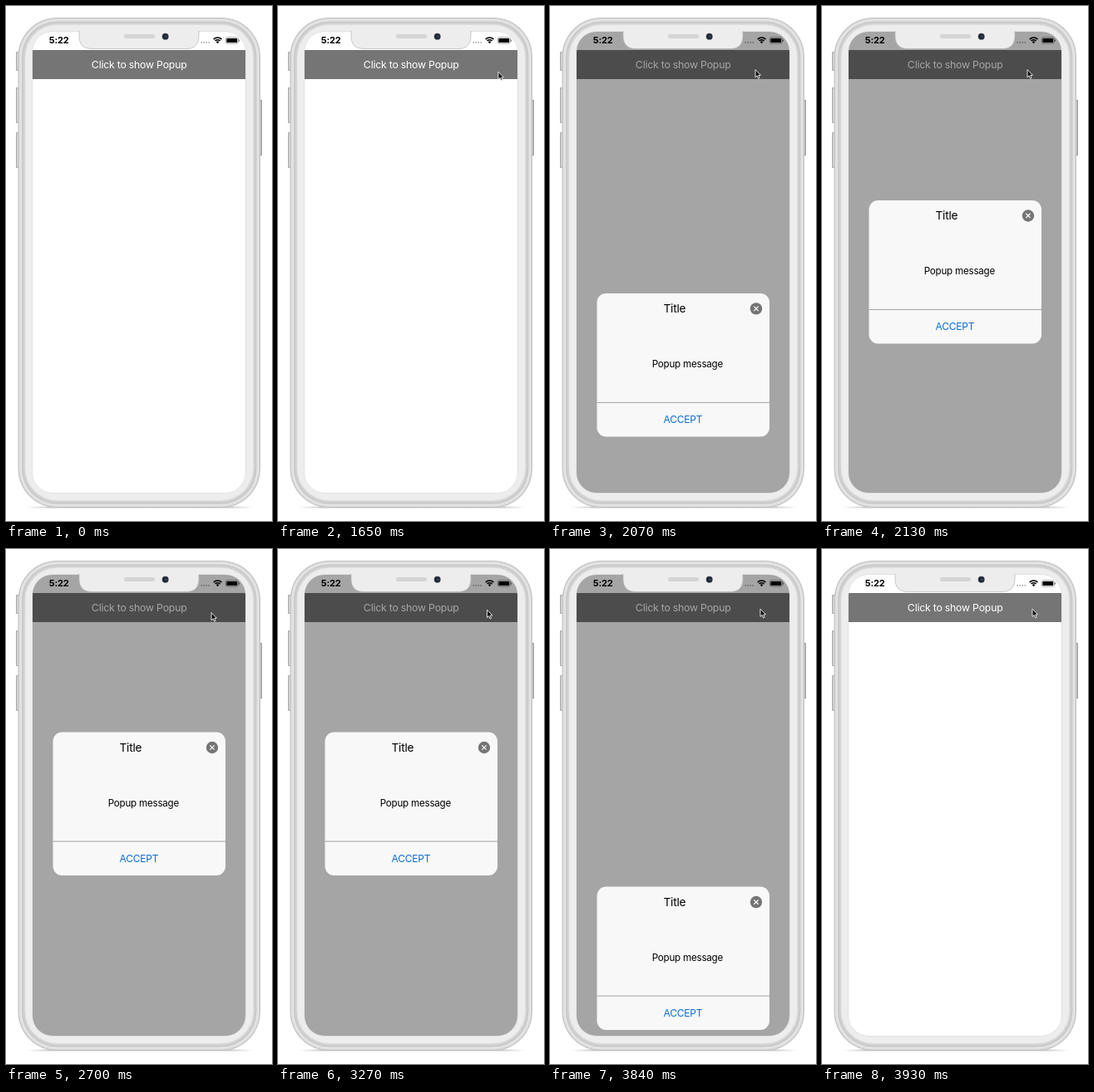
An HTML page with a canvas that plays this animation: 320 by 620 pixels, repeating every 4.23 s.

```html
<!DOCTYPE html>
<html lang="en">
<head>
<meta charset="utf-8">
<title>Popup demo</title>
<style>
  html, body { margin: 0; width: 100%; height: 100%; overflow: hidden; background: #fff; }
  canvas { display: block; width: 320px; height: 620px; }
</style>
</head>
<body>
<canvas id="stage"></canvas>
<script>
const W = 320, H = 620, LOOP = 4230, STEP = 30;
const FONT = 'Inter, "Liberation Sans", sans-serif';
const canvas = document.getElementById('stage');
const ctx = canvas.getContext('2d');
const dpr = window.devicePixelRatio || 1;
canvas.width = W * dpr;
canvas.height = H * dpr;

const clamp = v => Math.min(1, Math.max(0, v));
const sineInOut = p => (1 - Math.cos(Math.PI * clamp(p))) / 2;
const mix = (a, b, p) => a + (b - a) * p;

function box(x, y, w, h, r, fill) {
  ctx.beginPath();
  ctx.roundRect(x, y, w, h, r);
  if (fill) {
    ctx.fillStyle = fill;
    ctx.fill();
  }
}

function disc(x, y, r, fill) {
  ctx.beginPath();
  ctx.arc(x, y, r, 0, Math.PI * 2);
  ctx.fillStyle = fill;
  ctx.fill();
}

function text(str, x, y, size, color, spacing = 0, weight = 400) {
  ctx.font = `${weight} ${size}px ${FONT}`;
  ctx.letterSpacing = spacing + 'px';
  ctx.textAlign = 'center';
  ctx.fillStyle = color;
  ctx.fillText(str, x + spacing / 2, y);
}

function drawBody() {
  const shade = ctx.createLinearGradient(24, 0, 298, 0);
  shade.addColorStop(0, '#aaa0');
  shade.addColorStop(0.1, '#aaa9');
  shade.addColorStop(0.9, '#aaa9');
  shade.addColorStop(1, '#aaa0');
  box(24, 602.5, 274, 2, 1, shade);

  for (const [y, h] of [[55, 23], [98, 43], [152, 43]]) {
    box(12, y, 4, h, 1, '#a9a9a9');
    box(13, y + 1, 3, h - 2, 0.5, '#d4d4d4');
  }
  box(304, 113, 4, 67, 1, '#979797');
  box(304, 114, 3, 65, 0.5, '#c7c7c7');

  const rings = [[0, '#c0c0c0'], [1, '#dcdcdc'], [2, '#e3e3e3'],
                 [4.5, '#c8c8c8'], [6, '#d1d1d1'], [8, '#e0e0e0'], [9, '#ededed']];
  for (const [d, color] of rings)
    box(14.5 + d, 14 + d, 291.5 - 2 * d, 590 - 2 * d, 47 - d, color);
}

function drawNotch() {
  ctx.beginPath();
  ctx.moveTo(88, 30);
  ctx.lineTo(88, 36);
  ctx.bezierCurveTo(88, 46, 93, 51.5, 103, 51.5);
  ctx.lineTo(217, 51.5);
  ctx.bezierCurveTo(227, 51.5, 232, 46, 232, 36);
  ctx.lineTo(232, 30);
  ctx.fillStyle = '#ededed';
  ctx.fill();
  ctx.strokeStyle = '#b5b5b5';
  ctx.lineWidth = 0.7;
  ctx.stroke();
  box(142, 34, 37, 5, 2.5, '#d4d4d4');
  disc(191.7, 36.8, 4, '#4a4d55');
  disc(191.7, 36.8, 3.2, '#1c2333');
  disc(192.3, 36.8, 1.5, '#34486b');
}

function drawStatus() {
  text('5:22', 63.7, 45.3, 11, '#000', -0.2, 700);
  for (let i = 0; i < 4; i++) disc(235.3 + i * 3, 43.8, 0.85, '#999');

  ctx.strokeStyle = '#000';
  ctx.lineWidth = 1.5;
  for (const r of [4.3, 6.9]) {
    ctx.beginPath();
    ctx.arc(254.6, 45, r, -Math.PI * 0.75, -Math.PI * 0.25);
    ctx.stroke();
  }
  ctx.beginPath();
  ctx.moveTo(254.6, 45.3);
  ctx.arc(254.6, 45, 2.5, -Math.PI * 0.75, -Math.PI * 0.25);
  ctx.fillStyle = '#000';
  ctx.fill();

  box(264.3, 37.8, 15, 7.4, 2.2);
  ctx.strokeStyle = '#777';
  ctx.lineWidth = 0.7;
  ctx.stroke();
  box(265.4, 38.9, 12.8, 5.2, 1.2, '#000');
  box(280, 40.2, 1, 2.6, 0.5, '#777');
}

function drawPopup(top) {
  ctx.save();
  ctx.translate(0, top);
  box(56.5, 0, 207.5, 172.5, 11, '#f8f8f8');
  text('Title', 150, 23.5, 13.7, '#000', -0.2);
  text('Popup message', 165.5, 89, 11.6, '#000', -0.22);
  ctx.fillStyle = '#a3a3a3';
  ctx.fillRect(56.5, 131, 207.5, 1);
  text('ACCEPT', 160, 156, 12, '#0a6cd8', -0.2);
  disc(248, 18.5, 7.2, '#757575');
  ctx.beginPath();
  for (const s of [-1, 1]) {
    ctx.moveTo(245.3, 18.5 - 2.7 * s);
    ctx.lineTo(250.7, 18.5 + 2.7 * s);
  }
  ctx.strokeStyle = '#fff';
  ctx.lineWidth = 1.2;
  ctx.stroke();
  ctx.restore();
}

const REST = 220.5, TRAVEL = 391, SLIDE = 227;

function popupTop(t) {
  const away = t < 3000 ? 1 - sineInOut((t - 1930) / SLIDE) : sineInOut((t - 3730) / SLIDE);
  return REST + TRAVEL * away;
}

function drawScreen(t) {
  const open = t >= 1950 && t < 3930;
  ctx.save();
  box(32, 31, 256, 555, 24);
  ctx.strokeStyle = '#d4d4d4';
  ctx.lineWidth = 1;
  ctx.stroke();
  ctx.clip();
  ctx.fillStyle = '#fff';
  ctx.fillRect(32, 31, 256, 555);
  ctx.fillStyle = '#757575';
  ctx.fillRect(32, 53, 256, 35);
  text('Click to show Popup', 160.3, 75.2, 12.3, '#fff', -0.22);
  drawStatus();
  if (open) {
    ctx.fillStyle = 'rgba(0, 0, 0, 0.353)';
    ctx.fillRect(32, 31, 256, 555);
    drawPopup(popupTop(t));
  }
  ctx.restore();
}

function drawCursor(t) {
  if (t < 1650) return;
  const a = clamp((t - 1650) / 90), b = sineInOut((t - 3090) / 270);
  ctx.save();
  ctx.translate(mix(265, 247, a) + 6 * b, mix(79.3, 76.6, a) - 4.4 * b);
  ctx.beginPath();
  ctx.moveTo(0, 0);
  ctx.lineTo(0, 9.2);
  ctx.lineTo(2.1, 7.3);
  ctx.lineTo(3.6, 10.7);
  ctx.lineTo(5.1, 10);
  ctx.lineTo(3.7, 6.8);
  ctx.lineTo(6.5, 6.6);
  ctx.closePath();
  ctx.lineJoin = 'round';
  ctx.fillStyle = '#111';
  ctx.fill();
  ctx.strokeStyle = '#f4f4f4';
  ctx.lineWidth = 0.9;
  ctx.stroke();
  ctx.restore();
}

const start = performance.now();

function frame() {
  const now = (performance.now() - start) % LOOP;
  const t = Math.floor(now / STEP) * STEP;
  ctx.setTransform(dpr, 0, 0, dpr, 0, 0);
  ctx.fillStyle = '#fff';
  ctx.fillRect(0, 0, W, H);
  drawBody();
  drawScreen(t);
  drawNotch();
  drawCursor(t);
  requestAnimationFrame(frame);
}
frame();
</script>
</body>
</html>
```
